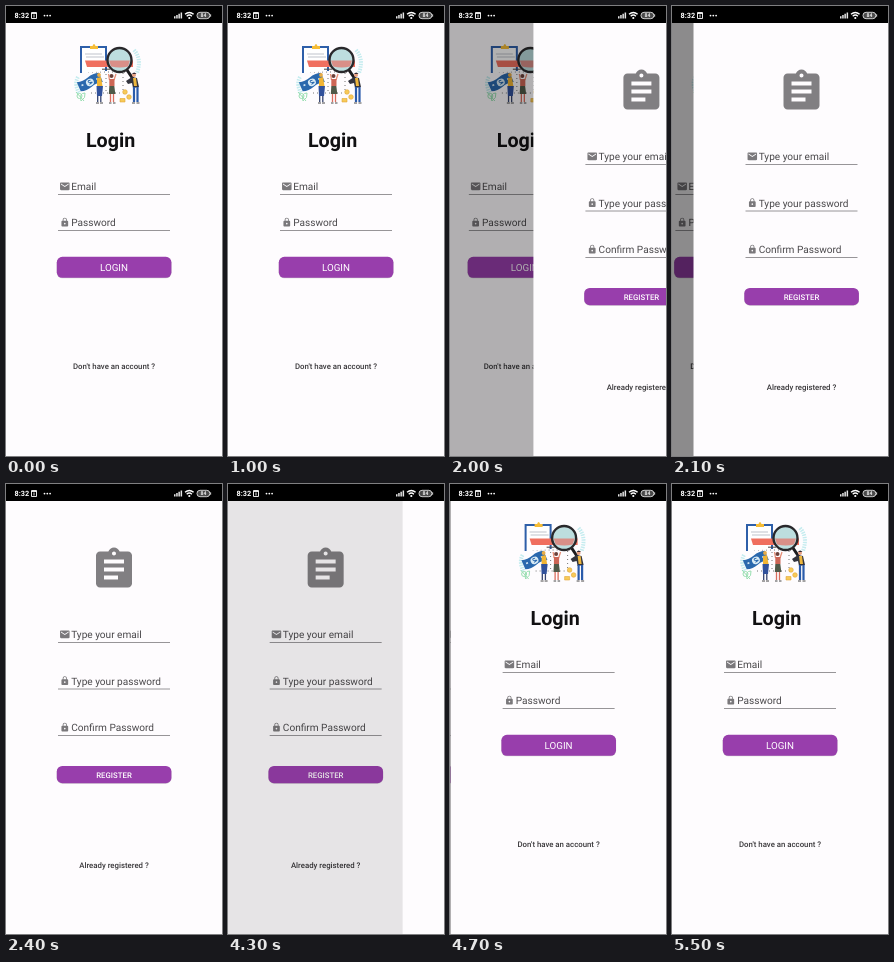
An HTML page that plays this animation: 216 by 450 pixels, repeating every 5.6 s.

```html
<!DOCTYPE html>
<html lang="en">
<head>
<meta charset="utf-8">
<title>Login and register</title>
<style>
  html, body { margin: 0; width: 100%; height: 100%; overflow: hidden; background: #fefcfe; }
  svg { display: block; width: 100%; height: 100%; }
  text { font-family: Roboto, sans-serif; text-rendering: geometricPrecision; }
  .field { font-size: 10.1px; fill: #4a484b; }
  .button { fill: #fff; text-anchor: middle; }
  .link { font-size: 7.8px; font-weight: 500; fill: #39373a; text-anchor: middle; }
  .icon { fill: #7a787b; }
</style>
</head>
<body>
<svg viewBox="0 0 216 450" xmlns="http://www.w3.org/2000/svg">
  <defs>
    <path id="mail" d="M20 4H4c-1.100 0-2 .9-2 2v12c0 1.100.9 2 2 2h16c1.100 0 2-.9 2-2V6c0-1.100-.9-2-2-2zm0 4l-8 5-8-5V6l8 5 8-5v2z"/>
    <path id="lock" d="M18 8h-1V6c0-2.760-2.240-5-5-5S7 3.240 7 6v2H6c-1.100 0-2 .9-2 2v10c0 1.100.9 2 2 2h12c1.100 0 2-.9 2-2V10c0-1.100-.9-2-2-2zm-6 9c-1.100 0-2-.9-2-2s.9-2 2-2 2 .9 2 2-.9 2-2 2zm3.100-9H8.900V6c0-1.710 1.390-3.100 3.100-3.100s3.100 1.390 3.100 3.100v2z"/>
    <path id="form" d="M19 3h-4.180C14.400 1.840 13.300 1 12 1s-2.400.84-2.820 2H5c-1.100 0-2 .9-2 2v14c0 1.100.9 2 2 2h14c1.100 0 2-.9 2-2V5c0-1.100-.9-2-2-2zm-7 0c.55 0 1 .45 1 1s-.45 1-1 1-1-.45-1-1 .45-1 1-1zm2 14H7v-2h7v2zm3-4H7v-2h10v2zm0-4H7V7h10v2z"/>

    <g id="art">
      <!-- dotted backdrop -->
      <path d="M128 44q8 9 3 23M72 71q-4 7 1 16" fill="none" stroke="#c5ecef" stroke-width="4" stroke-dasharray="1.500 1"/>
      <path d="M82 66h40M85 87h36M100 68v18M117 67v20" stroke="#666" stroke-width=".9" stroke-dasharray="1 3"/>
      <!-- clipboard -->
      <path d="M75 67V41h25v24" fill="#fff" stroke="#2e5fa9" stroke-width="2"/>
      <path d="M84 43v-3h2.500q1.500-4 3 0H92v3z" fill="#f6bd36"/>
      <path d="M79 48h17M80 51h18" stroke="#bfc3cb" stroke-width="1"/>
      <path d="M79 54.500h48v6.500H81z" fill="#f0705f"/>
      <path d="M96 63.200h8" stroke="#444" stroke-width="1"/>
      <!-- magnifier -->
      <path d="M121 64l6 9" stroke="#1c1b1e" stroke-width="3"/>
      <circle cx="113.500" cy="54" r="12" fill="#bddedf" stroke="#29282b" stroke-width="2.400"/>
      <path d="M103 54.500h21l-2 6q-8 2-17 0z" fill="#d98f88"/>
      <!-- banknote -->
      <g transform="rotate(-23 84 76.500)">
        <path d="M72 71q6 2 12 0t12 0v10q-6-2-12 0t-12 0z" fill="#2a68ad"/>
        <ellipse cx="84" cy="76.300" rx="4" ry="3.600" fill="#d9ebf5"/>
        <path d="M85.300 74.600q-2.600-1-2.600.5t2.600 1.700-2.600 1.300" fill="none" stroke="#2a68ad" stroke-width=".9"/>
        <path d="M75 76h2M91 76h2" stroke="#d9ebf5" stroke-width="1.500"/>
      </g>
      <!-- plants -->
      <g fill="none" stroke="#9adfb2" stroke-width="1">
        <circle cx="73.500" cy="90" r="2.500"/>
        <path d="M75 95q-2-8 4-8 1 5-4 8M70 86l8 9"/>
      </g>
      <!-- left figure -->
      <circle cx="93" cy="69" r="1.900" fill="#e9ac45"/>
      <path d="M91 72l4-1 1.500 9h-5.500z" fill="#f2b535"/>
      <path d="M90.500 80h6.500l-1 10h-5z" fill="#31519b"/>
      <path d="M91.700 90v6M94.800 90v6" stroke="#35436f" stroke-width="1.300"/>
      <path d="M90 97h3M94 97h3" stroke="#333" stroke-width=".9"/>
      <!-- middle figure -->
      <path d="M103.500 74l-1-6M108 74l2-6" stroke="#e89078" stroke-width="1.300"/>
      <circle cx="105.500" cy="70" r="2" fill="#6d4039"/>
      <path d="M103.300 73h5.200v7h-5.200z" fill="#cd6656"/>
      <path d="M103.300 80h5l1 8h-6.500z" fill="#4f5948"/>
      <path d="M104.500 88v8M107.500 88v8" stroke="#d96e5e" stroke-width="1.300"/>
      <path d="M103 97h2.500M107 97h2.500" stroke="#333" stroke-width=".9"/>
      <!-- right figure -->
      <circle cx="128" cy="69" r="2" fill="#e7a184"/>
      <path d="M126 68q2-3 4.500 0z" fill="#302a34"/>
      <path d="M120 75l6-4 5 1 2 9-6 1-1-5-4 1z" fill="#33343e"/>
      <path d="M127 72l3 0 1 8h-3z" fill="#edb63d"/>
      <path d="M128 81v15M131.500 81v15" stroke="#2a5bab" stroke-width="2.200"/>
      <path d="M126 97h3M130.500 97h3" stroke="#333" stroke-width=".9"/>
      <!-- coins -->
      <g fill="#f7ca58" stroke="#e1a63a" stroke-width=".6">
        <circle cx="119" cy="86" r="2.300"/><circle cx="123" cy="91" r="2.300"/>
        <path d="M114 92.500h5v3.500h-5z"/>
      </g>
    </g>
  </defs>

  <g id="pages"></g>

  <g id="status" fill="#fff">
    <rect width="216" height="17" fill="#000"/>
    <text x="8.500" y="12" font-size="7.300" font-weight="700">8:32</text>
    <path d="M25.500 6.500h5v6h-5zM25.500 7.500h5M28 8.500v3" fill="none" stroke="#fff" stroke-width=".9"/>
    <circle cx="38.500" cy="9.600" r=".9"/><circle cx="41.300" cy="9.600" r=".9"/><circle cx="44.100" cy="9.600" r=".9"/>
    <path d="M168 10.300h1.500v2.200H168zM170.200 9h1.500v3.500h-1.500zM172.400 7.700h1.500v4.800h-1.500zM174.600 6.400h1.500v6.100h-1.500z" opacity=".9"/>
    <path d="M179 8.300q4.300-3.600 8.600 0M180.700 10.200q2.600-2.200 5.200 0" fill="none" stroke="#fff" stroke-width="1.400"/>
    <circle cx="183.300" cy="12" r="1.100"/>
    <rect x="191" y="6.300" width="12.800" height="6.400" rx="3" fill="#4a4a4a" stroke="#ddd" stroke-width=".9"/>
    <path d="M204.300 8.300h.8v2.400h-.8z"/>
    <text x="197.400" y="11.400" font-size="5.200" font-weight="500" text-anchor="middle">84</text>
  </g>
</svg>

<script>
  const LOOP = 5600, TICK = 100, WIDTH = 216;
  const PARALLAX = WIDTH / 4, MAX_DIM = 0.5, STIFFNESS = 18.2;
  const OPEN_REGISTER = 1886, OPEN_LOGIN = 4256;
  const root = document.getElementById('pages');

  const icon = (name, cx, cy, scale) =>
    `<use href="#${name}" class="icon" transform="translate(${cx} ${cy}) scale(${scale}) translate(-12 -12)"/>`;

  // A labelled input; y is its underline
  const field = (name, label, y) =>
    icon(name, 58.8, y - 8.1, name === 'mail' ? 0.475 : 0.42) +
    `<text class="field" x="65.2" y="${y - 4.1}">${label}</text>
     <path d="M52 ${y}h112" stroke="#979598" stroke-width="1"/>`;

  const button = (label, y, height, style) =>
    `<rect x="50.7" y="${y + 0.5}" width="114.8" height="${height}" rx="5.5" fill="#000" opacity=".18"/>
     <rect x="50.8" y="${y}" width="114.6" height="${height}" rx="5.5" fill="#983eac"/>
     <text class="button" x="108" ${style}>${label}</text>`;

  const link = (label, y) => `<text class="link" x="108" y="${y}">${label}</text>`;

  function makePage(content) {
    const page = document.createElementNS('http://www.w3.org/2000/svg', 'g');
    page.innerHTML = `<rect width="216" height="450" fill="#fefcfe"/>${content}
      <rect class="dim" width="216" height="450" opacity="0"/>`;
    return page;
  }

  const login = makePage(
    '<use href="#art"/>' +
    '<text x="104.6" y="140.7" font-size="19.7" font-weight="700" fill="#111012" text-anchor="middle">Login</text>' +
    field('mail', 'Email', 188.5) +
    field('lock', 'Password', 224.5) +
    button('LOGIN', 250.8, 21, 'y="265.2" font-size="9.8"') +
    link("Don't have an account ?", 363.3));

  const register = makePage(
    icon('form', 108, 85.5, 2).replace('class="icon"', 'fill="#817f82"') +
    field('mail', 'Type your email', 158.5) +
    field('lock', 'Type your password', 205) +
    field('lock', 'Confirm Password', 251.5) +
    button('REGISTER', 282, 17.2, 'y="293.6" font-size="7.8" font-weight="500"') +
    link('Already registered ?', 384.2));

  function place(page, x, dim) {
    page.setAttribute('transform', `translate(${x.toFixed(2)} 0)`);
    page.querySelector('.dim').setAttribute('opacity', dim.toFixed(3));
  }

  // Critically damped spring from 0 to 1
  function spring(ms) {
    if (ms <= 0) return 0;
    const k = STIFFNESS * ms / 1000;
    return k > 8.8 ? 1 : 1 - Math.exp(-k) * (1 + k);
  }

  function slide(below, above, p) {
    if (root.lastChild !== above) root.append(below, above);
    place(below, -PARALLAX * p, MAX_DIM * p);
    place(above, WIDTH * (1 - p), 0);
  }

  function render(ms) {
    // The screen refreshes ten times a second
    const t = Math.floor((ms % LOOP) / TICK) * TICK;
    if (t < OPEN_LOGIN) slide(login, register, spring(t - OPEN_REGISTER));
    else slide(register, login, spring(t - OPEN_LOGIN));
  }

  const start = performance.now();
  function loop() {
    render(performance.now() - start);
    requestAnimationFrame(loop);
  }
  loop();
</script>
</body>
</html>
```
